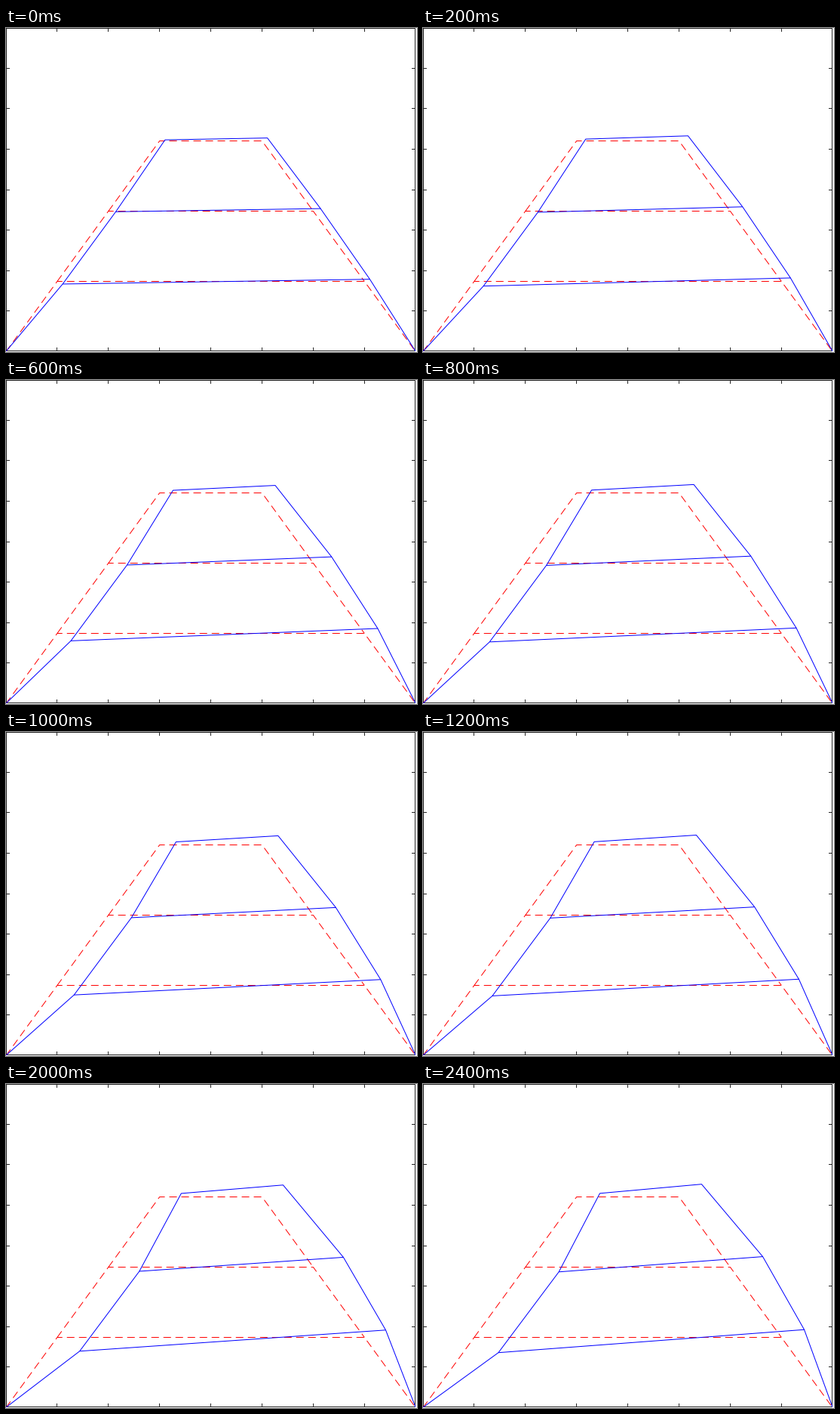
Animation of 545x429 px, one loop 2500 ms. Source, as a matplotlib script:

```python
import numpy as np
import matplotlib.pyplot as plt
from matplotlib.animation import FuncAnimation

W, H, DPI = 545, 429, 64
BOX_W, BOX_H = 543, 428
FRAMES, INTERVAL = 25, 100
UX, UY, BASE = 67.9, 53.55, 428.2  # pixels per data unit, row of y = 0
PX = 72 / DPI  # one pixel in points
INK = (0.15, 0.15, 0.15)
TICK = 4.5

# Each storey: two legs and a rigid rung; legs turn and stretch, rungs tilt
RUNGS = np.array([6, 4, 2])
LEG, LEG_ANGLE = 2, 60
LEG_TURN = np.array([-17.4, -0.6, 7.6])
LEG_STRETCH = np.array([0, 0.32, 0.10])
RUNG_TILT = np.array([5.44, 5.41, 6.5])


def polar(length, degrees):
    return length * np.exp(1j * np.radians(degrees))


def storeys(s):
    """Joints of the three storeys (left foot, left, right, right foot)."""
    legs = polar(LEG + LEG_STRETCH * s, LEG_ANGLE + LEG_TURN * s)
    left = np.cumsum(np.append(0, legs))
    right = np.append(8, left[1:] + polar(RUNGS, RUNG_TILT * s))
    return [np.array([left[k], left[k + 1], right[k + 1], right[k]])
            for k in range(3)]


def to_px(z):
    return z.real * UX, BASE - z.imag * UY


def crisp(v):
    return np.floor(v) + 0.5


fig = plt.figure(figsize=(W / DPI, H / DPI), dpi=DPI, facecolor="white")
ax = fig.add_axes([0, 1 - BOX_H / H, BOX_W / W, BOX_H / H])
ax.set(xlim=(0, BOX_W), ylim=(BOX_H, 0))
ax.axis("off")


def line(xs, ys, color, **style):
    return ax.plot(xs, ys, color=color, lw=PX, snap=False, **style)[0]


def draw_box():
    x0, y0, x1, y1 = 0.5, 0.5, BOX_W - 0.5, BOX_H - 0.5
    line([x0, x1, x1, x0, x0], [y0, y0, y1, y1, y0], INK,
         solid_joinstyle="miter", solid_capstyle="projecting")
    for k in range(1, 8):
        x, y = crisp(k * UX), crisp(BASE - k * UY)
        for edge, step in ((y0, TICK), (y1, -TICK)):
            line([x, x], [edge, edge + step], INK, solid_capstyle="butt")
        for edge, step in ((x0, TICK), (x1, -TICK)):
            line([edge, edge + step], [y, y], INK, solid_capstyle="butt")


draw_box()
for z in storeys(0):
    x, y = to_px(z)
    line(x, crisp(y), "red", ls=(0, (10, 6)), dash_capstyle="butt")
bent = [line([], [], "blue", solid_capstyle="butt") for _ in RUNGS]


def update(i):
    s = ((i + 1) / FRAMES) ** 0.49
    for path, z in zip(bent, storeys(s)):
        path.set_data(*to_px(z))
    return bent


anim = FuncAnimation(fig, update, frames=FRAMES, interval=INTERVAL,
                     init_func=lambda: update(0), repeat=True, repeat_delay=0)
plt.show()
```
